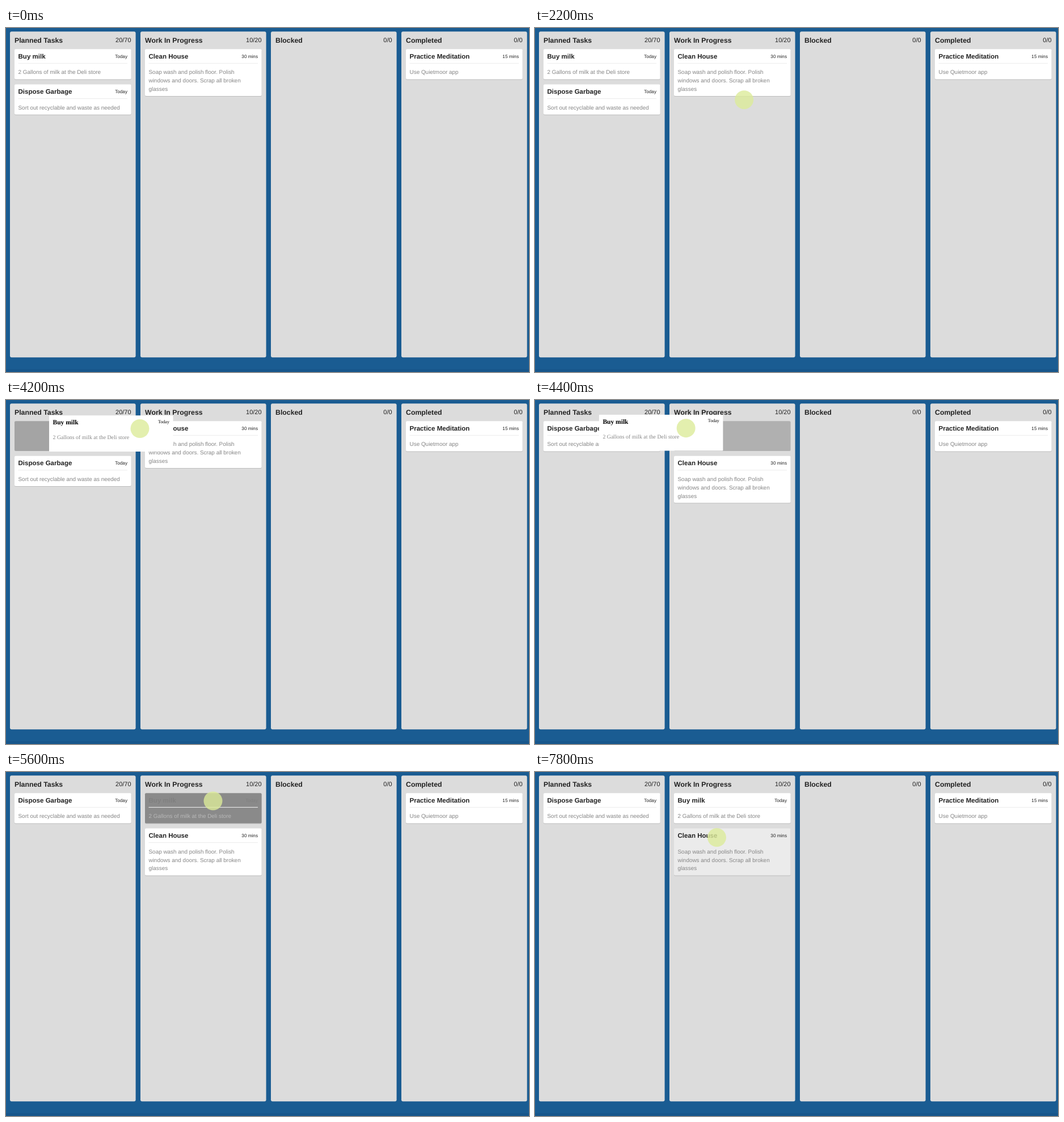
Recreate the animation shown at these times as an HTML page. Size 922 by 607 pixels, loop 8 s.

```html
<!DOCTYPE html>
<html lang="en">
<head>
<meta charset="utf-8">
<title>Task board</title>
<style>
  html, body { margin: 0; width: 100%; height: 100%; overflow: hidden; background: #1a5c92; }
  svg { display: block; font-family: "Liberation Sans", Arial, sans-serif; text-rendering: geometricPrecision; }
  .clone { font-family: "Liberation Serif", "Times New Roman", serif; }
</style>
</head>
<body>
<svg id="stage" width="922" height="607" viewBox="0 0 922 607"></svg>
<script>
const LOOP = 8000, STEP = 200;
const stage = document.getElementById('stage');

const columns = [['Planned Tasks', '20/70'], ['Work In Progress', '10/20'], ['Blocked', '0/0'], ['Completed', '0/0']];
const milk = ['Buy milk', 'Today', ['2 Gallons of milk at the Deli store']];
const garbage = ['Dispose Garbage', 'Today', ['Sort out recyclable and waste as needed']];
const house = ['Clean House', '30 mins', ['Soap wash and polish floor. Polish', 'windows and doors. Scrap all broken', 'glasses']];
const meditate = ['Practice Meditation', '15 mins', ['Use Quietmoor app']];

const plain = { bg: '#fff', title: '#222', body: '#868686', line: '#ececec' };
const hovered = { ...plain, bg: '#ebebeb', line: '#ebebeb' };

// Points are [ms, x, y]
const cursorPath = [
  [600, 272, 24], [1000, 150, 46], [1200, 121.8, 54.5], [1600, 118, 69],
  [2000, 118, 69], [2600, 870, 242], [3000, 170, 62], [3400, 181, 65],
  [4000, 181, 65], [4200, 236, 50.5], [5000, 356.7, 47], [5400, 365, 51], [5600, 365, 51],
  [6400, 405, 67], [6600, 385, 130], [6800, 345, 140], [7000, 330, 116], [7600, 330, 116], [7800, 320.5, 115.5]
];
const clonePath = [[4200, 76, 27.3], [5000, 223.7, 21.7], [5200, 215, 23]];

function along(path, t) {
  const i = path.findIndex(p => p[0] > t);
  if (i < 0) return path[path.length - 1].slice(1);
  const [t0, x0, y0] = path[Math.max(i - 1, 0)], [t1, x1, y1] = path[i];
  const k = t1 > t0 ? (t - t0) / (t1 - t0) : 0;
  return [x0 + (x1 - x0) * k, y0 + (y1 - y0) * k];
}

const rect = (x, y, w, h, fill, r = 0) =>
  `<rect x="${x}" y="${y}" width="${w}" height="${h}" rx="${r}" fill="${fill}"/>`;
const text = (x, y, s, size, fill, extra = '') =>
  `<text x="${x}" y="${y}" font-size="${size}" fill="${fill}" ${extra}>${s}</text>`;
const BOLD = 'font-weight="700"', END = 'text-anchor="end"';

const left = col => 15 + col * 230;

function card(col, y, [title, when, lines], look = plain) {
  const x = left(col), h = 53.3 + (lines.length - 1) * 14.8;
  return rect(x, y + 1, 205.6, h, '#bdbdbd', 2) + rect(x, y, 205.6, h, look.bg, 2) +
    rect(x + 6.5, y + 24.6, 192.5, 1, look.line) +
    text(x + 6.5, y + 16.6, title, 11.55, look.title, BOLD) +
    text(x + 199, y + 15.7, when, 8.2, look.title, END) +
    lines.map((s, i) => text(x + 6.5, y + 44.2 + i * 14.8, s, 9.93, look.body)).join('');
}

const slot = (col, fill) => rect(left(col), 37.2, 205.6, 52.8, fill, 2);

function clone([x, y], [title, when, lines]) {
  return `<g class="clone" transform="translate(${x} ${y})">` + rect(0, 0, 218.5, 63.7, '#fff', 1) +
    text(6.5, 16, title, 11.5, '#000', BOLD) + text(212, 13.4, when, 8.1, '#000', END) +
    text(6.5, 42.2, lines[0], 9.9, '#868686') + '</g>';
}

// A dropped card brightens from grey to its normal look
function dropped(t) {
  const k = Math.min(Math.max((t - 5600) / 600, 0), 1);
  const grey = (a, b) => { const v = Math.round(a + (b - a) * k); return `rgb(${v},${v},${v})`; };
  return { bg: grey(138, 255), title: grey(128, 34), body: grey(184, 134), line: grey(245, 236) };
}

const board = rect(0, 0, 922, 607, '#1a5c92') + rect(0, 602, 922, 5, '#17568b') +
  columns.map(([name, count], i) =>
    rect(left(i) - 8, 6.3, 221.6, 575, '#dcdcdc', 3) +
    text(left(i), 26.4, name, 12.3, '#222', BOLD) +
    text(left(i) + 205.6, 25, count, 11, '#222', END)).join('') +
  card(3, 37.2, meditate);

function cards(t) {
  const top = 37.2, second = 99.5, shifted = 98.7;
  if (t < 4200) return card(0, top, milk) + card(0, second, garbage) + card(1, top, house);
  if (t < 4400) return slot(0, '#a4a4a4') + card(0, shifted, garbage) + card(1, top, house);
  if (t < 5400) return card(0, top, garbage) + slot(1, '#b0b0b0') + card(1, shifted, house);
  return card(0, top, garbage) + card(1, top, milk, dropped(t)) +
    card(1, second, house, t < 6600 ? plain : hovered);
}

function draw(t) {
  let out = board + cards(t);
  if (t >= 4200 && t < 5400) out += clone(along(clonePath, t), milk);
  if (t >= 600) {
    const [x, y] = along(cursorPath, t);
    out += `<circle cx="${x}" cy="${y}" r="16.5" fill="rgba(221,235,154,.8)"/>`;
  }
  stage.innerHTML = out;
}

let start, shown = -1;
function tick(now) {
  start ??= now;
  const t = Math.floor((now - start) % LOOP / STEP) * STEP;
  if (t !== shown) draw(shown = t);
  requestAnimationFrame(tick);
}
draw(0);
requestAnimationFrame(tick);
</script>
</body>
</html>
```
